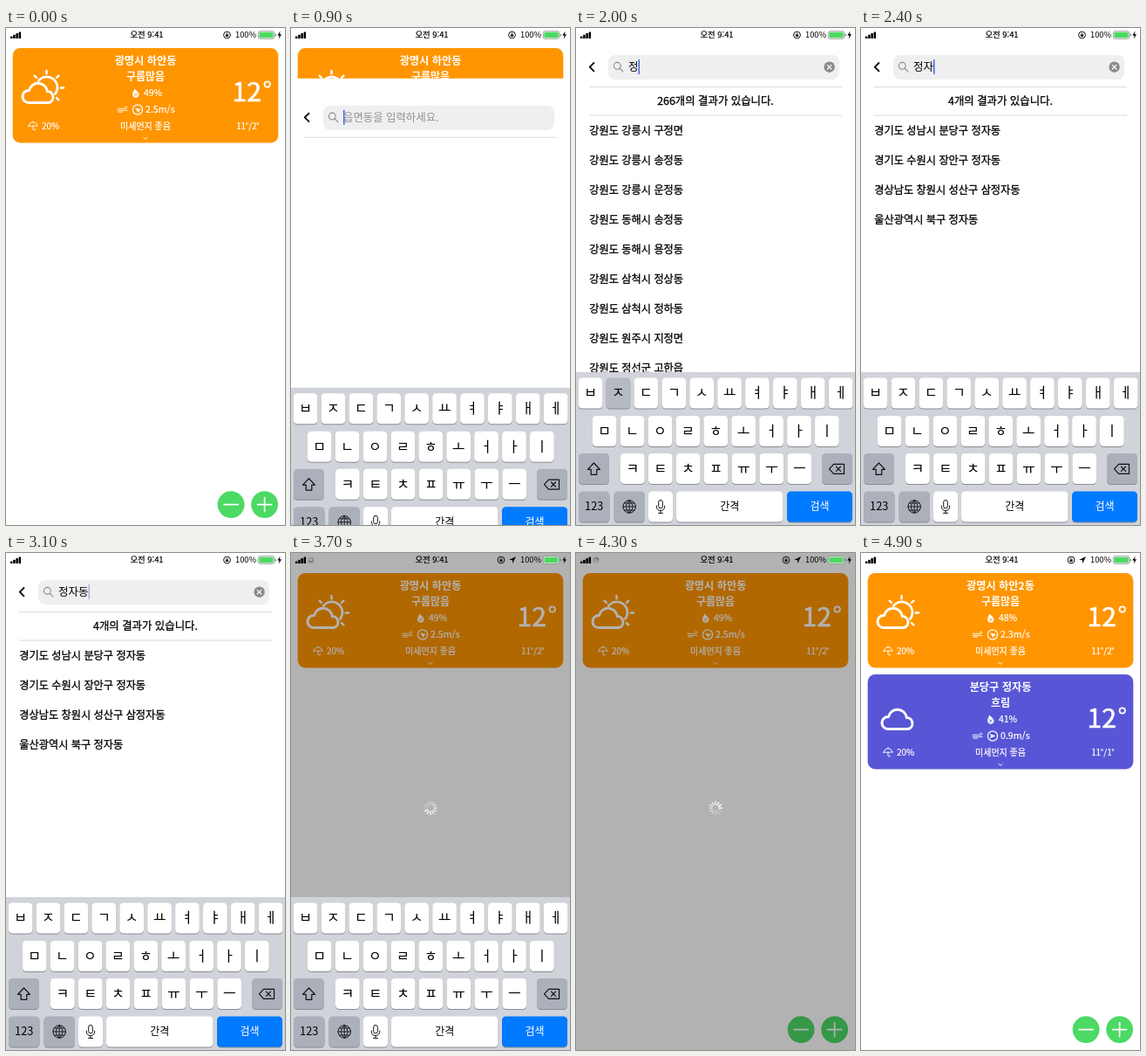
Write an HTML page that moves like this. It is 320x569 px and loops after 5 s.

```html
<!DOCTYPE html>
<html lang="ko">
<head>
<meta charset="utf-8">
<title>Weather</title>
<style>
html, body { margin: 0; width: 100%; height: 100%; overflow: hidden; background: #fff; }
svg { display: block; width: 100vw; height: 100vh; }
text { font-family: "Noto Sans CJK KR", "Noto Sans CJK", "Noto Sans CJK JP", sans-serif; white-space: pre; }
path { stroke-linecap: round; stroke-linejoin: round; }
</style>
</head>
<body>
<svg id="stage" viewBox="0 0 320 569">
  <g id="home"></g>
  <g id="search"></g>
  <rect id="dim" width="320" height="569"/>
  <g id="loader"></g>
  <g id="keyboard"></g>
  <g id="status"></g>
</svg>
<script>
const LOOP = 5000, STEP = 100;
const $ = id => document.getElementById(id);

// Text is placed by its vertical middle; medium weight is a thin outline on regular.
function text(x, y, size, str, { anchor = 'start', fill = '#000', weight = 400, id = '' } = {}) {
  const style = weight === 500 ? `stroke="${fill}" stroke-width="${size * 0.022}"` : `font-weight="${weight}"`;
  return `<text ${id && `id="${id}"`} x="${x}" y="${y + size * 0.37}" font-size="${size}" text-anchor="${anchor}" fill="${fill}" ${style}>${str}</text>`;
}
const rect = (x, y, w, h, r, fill, extra = '') =>
  `<rect x="${x}" y="${y}" width="${w}" height="${h}" rx="${r}" fill="${fill}" ${extra}/>`;
const circle = (x, y, r, fill, extra = '') => `<circle cx="${x}" cy="${y}" r="${r}" fill="${fill}" ${extra}/>`;
const line = (d, color, width, extra = '') =>
  `<path d="${d}" fill="none" stroke="${color}" stroke-width="${width}" ${extra}/>`;
const group = (id, content, extra = '') => `<g id="${id}" ${extra}>${content}</g>`;
const mid = (fill, weight, id) => ({ anchor: 'middle', fill, weight, id });

const spokes = (x, y, inner, outer, width, color) => Array.from({ length: 12 }, (_, i) =>
  line(`M${x} ${y - inner}V${y - outer}`, color, width, `class="spoke" transform="rotate(${i * 30} ${x} ${y})"`)).join('');

// Home screen
const CLOUD = 'M26 85.5a7 7 0 0 1 0-14h.6a10.5 10.5 0 0 1 20.7 1a6.6 6.6 0 0 1 1.7 13z';

function sunnyCloud() {
  const rays = [-135, -90, -45, 0, 45].map(a =>
    line('M62.8 68.5h3.2', '#fff', 2.5, `transform="rotate(${a} 46.5 68.5)"`)).join('');
  return line(CLOUD, '#fff', 3) + line('M37.2 60.6A12 12 0 0 1 56.4 75.5', '#fff', 2.7) + rays;
}

function card(color, { id, place, sky, humidity, wind, range, icon, heading }) {
  const w = '#fff';
  return rect(7.7, 23.1, 304.6, 108.4, 8.5, color) + icon +
    text(160, 37.4, 12.2, place, mid(w, 700, id + 'Place')) +
    text(160, 55.6, 12, sky, mid(w, 700)) +
    `<path d="M147.5 69.5c2.5 3 5 4 5 6.6a3.7 3.7 0 0 1-7.4 0c0-2.6 1.4-4 2.4-6.6z" fill="${w}"/>` +
    line('M147 74.5l3.5 3.5m0-3.5l-3.5 3.5', color, .8) +
    text(158, 74, 10.4, humidity, { fill: w, weight: 500, id: id + 'Humidity' }) +
    line('M128 92.3h9.5a1.2 1.2 0 1 0-1-1.8M128 94.4h11M129 96.2h4.5', w, .9) +
    circle(151, 93.5, 5.6, 'none', `stroke="${w}" stroke-width="1.2"`) +
    `<path d="M147.5 90.8l7 2.7-7 2.7 1.8-2.7z" fill="${w}" transform="rotate(${heading} 151 93.5)"/>` +
    text(160, 93, 10.6, wind, { fill: w, weight: 500, id: id + 'Wind' }) +
    line('M26 112.5a5 4.6 0 0 1 10 0q-1.6-1.5-3.3 0q-1.7-1.5-3.4 0q-1.7-1.5-3.3 0zM31 112.5v3.5a1.4 1.4 0 0 0 2.7 0M31 107.8v-.8', w, 1) +
    text(41, 112, 10, '20%', { fill: w, weight: 500 }) +
    text(160, 112, 10, '미세먼지 좋음', mid(w, 500)) +
    line('M157.8 125.4l2.2 2 2.2-2', w, .9) +
    text(259.5, 72.6, 30, '12', { fill: w, weight: 500 }) +
    circle(299.7, 64.5, 3.2, 'none', `stroke="${w}" stroke-width="1.8"`) +
    text(277.5, 112, 9.8, range, mid(w, 500));
}

const button = (x, sign) => circle(x, 545.6, 15.4, '#4cd964') + line(sign, '#fff', 1.7);

$('home').innerHTML =
  card('#ff9500', { id: 'first', place: '광명시 하안동', sky: '구름많음', humidity: '49%',
    wind: '2.5m/s', range: '11˚/2˚', icon: sunnyCloud(), heading: 215 }) +
  group('newCard', card('#5856d6', { id: 'second', place: '분당구 정자동', sky: '흐림', humidity: '41%',
    wind: '0.9m/s', range: '11˚/1˚', icon: `<g transform="translate(5)">${line(CLOUD, '#fff', 3)}</g>`, heading: 0 }),
    'transform="translate(0 116)"') +
  button(258.1, 'M250.1 545.6h16') +
  button(296.6, 'M288.6 545.6h16m-8-8v16');

// Search screen
$('search').innerHTML =
  rect(0, 0, 320, 569, 0, '#fff') +
  line('M20.5 40l-4.7 4.7 4.7 4.7', '#000', 1.8) +
  rect(37, 31, 265, 28, 8, '#efeff0') +
  circle(47.3, 43.3, 3.9, 'none', 'stroke="#8a8a8e" stroke-width="1.1"') +
  line('M50.2 46.2l3.6 3.7', '#8a8a8e', 1.2) +
  group('hint', text(60, 44.5, 12.4, '읍면동을 입력하세요.', { fill: '#929297' })) +
  text(60, 44.5, 12.5, '', { id: 'query' }) +
  rect(60, 36, 1.5, 17, .5, '#4468e0', 'id="caret"') +
  group('clear', circle(290.6, 44.7, 6.2, '#8a8a8e') + line('M288.3 42.4l4.6 4.6m0-4.6l-4.6 4.6', '#fff', 1.2)) +
  rect(15, 67, 290, 1, 0, '#dcdcdc') +
  group('results', '');

// Keyboard
const GRAY = '#abb0ba', HELD = '#b5b9c2', gray = { fill: GRAY, size: 12.8 };

function key(x, y, w, label, { fill = '#fff', color = '#000', size = 16, name = '' } = {}) {
  return rect(x, y + 1, w, 35, 4.5, '#898c92') +
    rect(x, y, w, 35, 4.5, fill, name && `data-key="${name}"`) +
    text(x + w / 2, y + 17, size, label, mid(color));
}
const keyRow = (letters, x, y) =>
  [...letters].map((c, i) => key(x + i * 31.9, y, 27.7, c, { name: c })).join('');

$('keyboard').innerHTML =
  rect(0, 394, 320, 180, 0, '#d0d3d9') +
  keyRow('ㅂㅈㄷㄱㅅㅛㅕㅑㅐㅔ', 2.7, 400.5) +
  keyRow('ㅁㄴㅇㄹㅎㅗㅓㅏㅣ', 18.8, 444) +
  keyRow('ㅋㅌㅊㅍㅠㅜㅡ', 51, 487) +
  key(3, 487, 35, '', gray) + key(282, 487, 35, '', gray) +
  key(3, 530.5, 35.5, '123', gray) + key(43.5, 530.5, 35.5, '', gray) +
  key(83, 530.5, 28, '') + key(115, 530.5, 122.5, '간격', { size: 12 }) +
  key(242, 530.5, 75, '검색', { fill: '#007aff', color: '#fff', size: 12 }) +
  line('M20.5 498l-7 7.3h3.7v6h6.6v-6h3.7z', '#111', 1.2) +
  line('M290.5 504.8l5-5.5h12v11h-12zM298.5 502.2l5 5.2m0-5.2l-5 5.2', '#111', 1.2) +
  circle(61.2, 548, 7.2, 'none', 'stroke="#111"') +
  line('M54 548h14.4M61.2 540.8v14.4M55.5 544h11.4M55.5 552h11.4M61.2 540.8c-5 4-5 10.4 0 14.4c5-4 5-10.4 0-14.4', '#111', .9) +
  rect(94.7, 540.5, 4.6, 9.5, 2.3, 'none', 'stroke="#111"') +
  line('M92.3 547v1a4.7 4.7 0 0 0 9.4 0v-1M97 552.8v2.6M94.5 555.4h5', '#111', 1);

// Status bar and loader
$('status').innerHTML =
  [0, 1, 2, 3].map(i => rect(5 + i * 3.2, 9.5 - i * 1.7, 2.5, 2.5 + i * 1.7, .5, '#000')).join('') +
  group('network', spokes(23, 8, 1.6, 3.2, .8, '#555')) +
  text(161.5, 8, 9.4, '오전 9:41', mid('#000', 500)) +
  group('lock', circle(253.5, 8, 3.9, 'none', 'stroke="#111"') +
    rect(251.9, 7.5, 3.2, 2.4, .3, '#111') + line('M252.6 7.5v-.8a.9.9 0 0 1 1.8 0v.8', '#111', .6)) +
  group('arrow', '<path d="M258 4l-8 3.9 3.9.2.2 3.9z"/>') +
  text(263, 8, 9.3, '100%') +
  rect(289.3, 3.7, 18.4, 8.6, 2, '#fff', 'stroke="#777" stroke-width=".7"') +
  rect(290.4, 4.8, 16.2, 6.4, 1, '#4cd964') +
  rect(308.5, 6.5, 1.2, 3, .6, '#777') +
  '<path d="M314.6 3.5l-3.3 5h2.2l-.8 4 3.3-5.2h-2.2z"/>';
$('loader').innerHTML = spokes(160, 292, 4, 7.4, 1.5, '#fff');

// Typing and its results
const presses = [[1600, 'ㅈ'], [1700, 'ㅓ'], [1900, 'ㅇ'], [2000, 'ㅈ'], [2300, 'ㅏ'], [2500, 'ㄷ'], [2700, 'ㅗ'], [2900, 'ㅇ']];
const typed = ['ㅈ', '저', '정', '정ㅈ', '정자', '정잗', '정자도', '정자동'];
const jeongja = ['경기도 성남시 분당구 정자동', '경기도 수원시 장안구 정자동', '경상남도 창원시 성산구 삼정자동', '울산광역시 북구 정자동'];
const found = {
  '저': [3, ['서울특별시 중구 저동1가', '서울특별시 중구 저동2가', '전라남도 순천시 저전동']],
  '정': [266, ['강릉시 구정면', '강릉시 송정동', '강릉시 운정동', '동해시 송정동', '동해시 용정동',
    '삼척시 정상동', '삼척시 정하동', '원주시 지정면', '정선군 고한읍'].map(s => '강원도 ' + s)],
  '정자': [4, jeongja],
  '정자동': [4, jeongja]
};

function showQuery(query) {
  $('query').textContent = query;
  show('hint', !query);
  show('clear', query);
  $('caret').setAttribute('x', 60 + query.length * 11.5);
  const [count, rows] = found[query] || [0, []];
  $('results').innerHTML = query &&
    text(160, 83, 12.4, `${count}개의 결과가 있습니다.`, mid('#000', 500)) +
    rect(15, 99.5, 290, 1, 0, '#dcdcdc') +
    rows.map((row, i) => text(15.3, 117.3 + i * 34, 12.2, row, { weight: 500 })).join('');
}

// Critically damped slide: 1 at the start, settling to 0.
function remaining(ms) {
  const u = Math.max(0, ms) * 0.01826;
  return (1 + u) * Math.exp(-u);
}
const ramp = (t, from, to) => Math.min(1, Math.max(0, (t - from) / (to - from)));
const show = (id, on) => { $(id).style.display = on ? '' : 'none'; };
const slide = (id, y) => $(id).setAttribute('transform', `translate(0 ${y})`);
const spokeLines = [...document.querySelectorAll('.spoke')];
const keys = [...document.querySelectorAll('[data-key]')];
let shownQuery = null;

function draw(t) {
  slide('search', 569 * (t < 3480 ? remaining(t - 688) : 1 - remaining(t - 3480)));
  slide('keyboard', 175 * (t < 3700 ? remaining(t - 688) : 1 - remaining(t - 3703)));
  show('search', t > 688 && t < 3900);
  show('keyboard', t > 688 && t < 4200);

  const count = presses.filter(([at]) => t >= at + STEP).length;
  const query = count ? typed[count - 1] : '';
  if (query !== shownQuery) showQuery(shownQuery = query);
  const held = presses.find(([at]) => t >= at && t < at + STEP);
  for (const k of keys) k.setAttribute('fill', held && held[1] === k.dataset.key ? HELD : '#fff');
  $('caret').style.opacity = 1 - ramp(t, 3000, 3180) + ramp(t, 3300, 3450);

  const shade = ramp(t, 3450, 3650) - ramp(t, 4400, 4600);
  $('dim').style.opacity = 0.3 * shade;
  $('loader').style.opacity = shade;
  show('network', t >= 3700 && t < 4600);
  const turn = Math.floor(t / 1000 * 12);
  spokeLines.forEach((s, i) => { s.style.opacity = 1 - ((turn - i % 12 + 120) % 12) * 0.07; });

  const located = t >= 3600, updated = t >= 4700;
  show('arrow', located);
  $('lock').setAttribute('transform', `translate(${located ? -12.5 : 0})`);
  show('newCard', updated);
  $('firstPlace').textContent = updated ? '광명시 하안2동' : '광명시 하안동';
  $('firstHumidity').textContent = updated ? '48%' : '49%';
  $('firstWind').textContent = updated ? '2.3m/s' : '2.5m/s';
}

const start = performance.now();
function tick() {
  const t = (performance.now() - start) % LOOP;
  draw(Math.floor(t / STEP) * STEP);
  requestAnimationFrame(tick);
}
tick();
</script>
</body>
</html>
```
